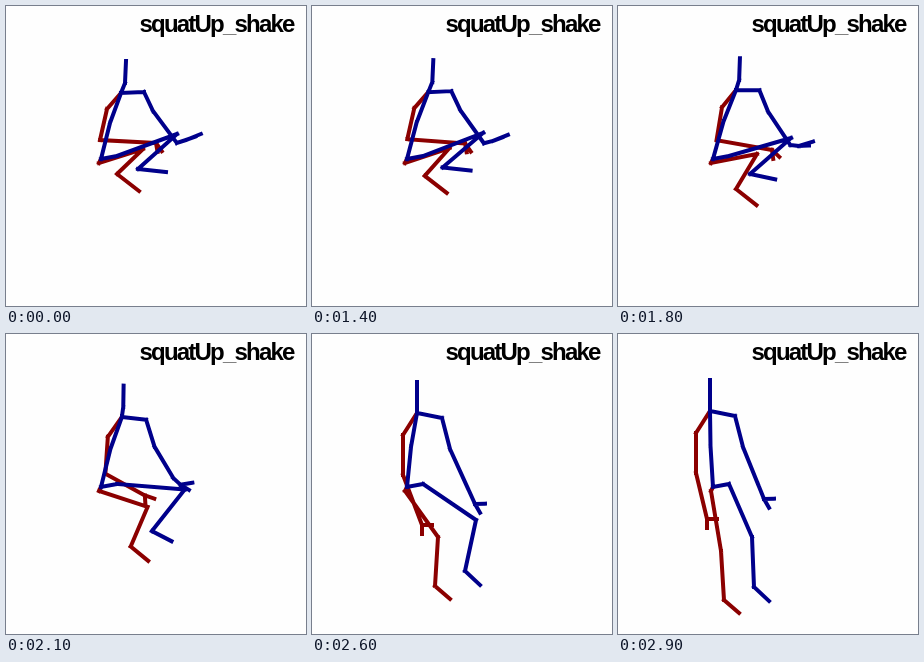
These frames come from a looping animation (300x300 px, 3 s). An HTML page:

```html
<!DOCTYPE html>
<html lang="en">
<head>
<meta charset="utf-8">
<title>squatUp_shake</title>
<style>
  html, body { margin: 0; width: 100%; height: 100%; overflow: hidden; background: #fefefe; }
  svg { display: block; width: 100%; height: 100%; }
  path { fill: none; stroke-width: 4; stroke-linecap: square; }
  text { font: bold 24px "Liberation Sans", Arial, sans-serif; letter-spacing: -1.8px; }
  .rule { fill: #777; }
</style>
</head>
<body>
<svg viewBox="0 0 300 300">
  <text x="133.5" y="26">squatUp<tspan class="rule">_</tspan>shake</text>
  <path id="right" stroke="#8b0000"/>
  <path id="left" stroke="#00008b"/>
</svg>
<script>
const LOOP = 3000, HOLD = 1100, STEP = 100;
const BASE = [95, 153], LEFT_HIP = [111, 150], RIGHT_HIP = [93, 157];

// Each driving joint passes its five points at these times; the rest of the body follows.
const KEY_TIMES = [HOLD, 1800, 2300, 2600, 2900];
const points = text => text.split(" ").map(p => p.split(",").map(Number));
const paths = {
  chest: points("115,87 118,84 113,82 105,79 92,77"),
  leftHand: points("180,134 181,140 169,159 163,170 146,165"),
  rightHand: points("150,137 154,144 126,175 110,191 89,185"),
  leftKnee: points("171,128 173,132 180,173 164,186 134,203"),
  leftAnkle: points("132,163 132,168 155,219 153,237 136,253"),
  rightKnee: points("137,143 139,148 141,191 126,203 103,217"),
  rightAnkle: points("111,168 118,183 128,234 123,252 106,266")
};

const add = (p, q) => [p[0] + q[0], p[1] + q[1]];
const mix = (p, q, k) => p.map((v, i) => v + (q[i] - v) * k);
const polar = (length, degrees) => {
  const a = degrees * Math.PI / 180;
  return [length * Math.cos(a), length * Math.sin(a)];
};
const smoothstep = (from, to, t) => {
  const k = Math.min(1, Math.max(0, (t - from) / (to - from)));
  return k * k * (3 - 2 * k);
};

// Cubic Hermite curve through the key points, starting from rest.
function along(path, time) {
  const last = path.length - 1;
  const t = Math.max(time, HOLD);
  const b = Math.max(1, KEY_TIMES.findIndex(key => key >= t)), a = b - 1;
  const span = KEY_TIMES[b] - KEY_TIMES[a];
  const k = (t - KEY_TIMES[a]) / span;
  return [0, 1].map(axis => {
    const slope = i => {
      if (i === 0) return 0;
      const n = Math.min(i + 1, last);
      return (path[n][axis] - path[i - 1][axis]) / (KEY_TIMES[n] - KEY_TIMES[i - 1]);
    };
    const ease = k * k * (3 - 2 * k);
    return path[a][axis] * (1 - ease) + path[b][axis] * ease +
      span * k * (1 - k) * ((1 - k) * slope(a) - k * slope(b));
  });
}

// Every bone is its own subpath, so each one gets its own caps.
const bones = (...joints) =>
  joints.slice(1).map((p, i) => `M${joints[i]}L${p}`).join("");

const left = document.getElementById("left");
const right = document.getElementById("right");

function draw(time) {
  const at = name => along(paths[name], time);
  const rise = smoothstep(1500, 2500, time);
  // Offset that changes from the squatting to the standing value.
  const offset = (squat, stand) => mix(squat, stand, rise);

  const chest = at("chest");
  const neck = add(chest, offset([4, -10], [0, -10]));
  const head = add(neck, offset([1, -22], [0, -21]));
  const waist = add(mix(chest, BASE, .5), [-1, -3]);

  const leftShoulder = add(chest, offset([23, -1], [25, 5]));
  const leftElbow = add(leftShoulder, offset([9, 19], [8, 31]));
  const leftHand = at("leftHand");
  const leftWrist = add(mix(leftElbow, leftHand, .72), offset([0, 11], [0, 0]));
  const leftThumb = add(leftHand, polar(16 - 6 * rise, -22 + 20 * rise));
  const leftTip = add(leftHand, polar(10, -20 + 80 * rise));
  const leftAnkle = at("leftAnkle");
  const leftFoot = add(leftAnkle, offset([28, 3], [15, 14]));

  const rightShoulder = add(chest, offset([-14, 16], [-14, 22]));
  const rightElbow = add(rightShoulder, offset([-7, 31], [0, 40]));
  const rightHand = at("rightHand");
  const rightThumb = add(rightHand, polar(10, 55 - 55 * rise));
  const rightTip = add(rightHand, polar(9, 80 + 10 * rise));
  const rightAnkle = at("rightAnkle");
  const rightFoot = add(rightAnkle, offset([22, 17], [15, 13]));

  right.setAttribute("d",
    bones(chest, rightShoulder, rightElbow, rightHand, rightThumb) +
    bones(rightHand, rightTip) +
    bones(BASE, RIGHT_HIP, at("rightKnee"), rightAnkle, rightFoot));
  left.setAttribute("d",
    bones(head, neck, chest, waist, BASE) +
    bones(chest, leftShoulder, leftElbow, leftWrist, leftHand, leftThumb) +
    bones(leftHand, leftTip) +
    bones(BASE, LEFT_HIP, at("leftKnee"), leftAnkle, leftFoot));
}

const start = performance.now();
function tick() {
  const t = (performance.now() - start) % LOOP;
  draw(Math.floor(t / STEP) * STEP);
  requestAnimationFrame(tick);
}
tick();
</script>
</body>
</html>
```
